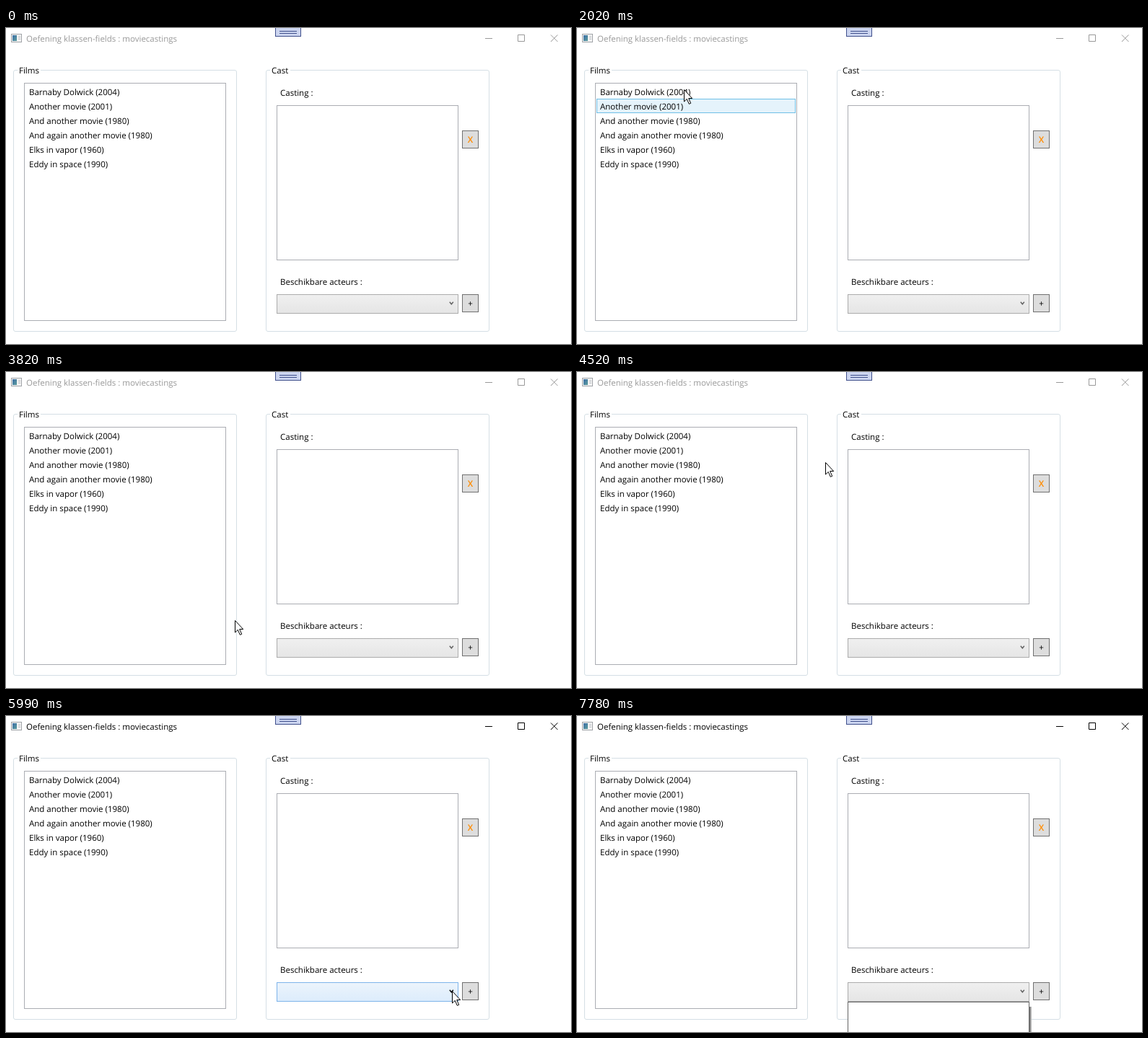
Write an HTML page that moves like this. It is 783 px wide and 438 px high and loops after 8000 ms.

```html
<!DOCTYPE html>
<html lang="nl">
<head>
<meta charset="utf-8">
<title>Moviecastings</title>
<style>
  html, body { margin: 0; width: 100%; height: 100%; overflow: hidden; background: #fff; }
  svg { display: block; width: 783px; height: 438px; }
  text { font: 11.5px "Open Sans", "Noto Sans", sans-serif; text-rendering: geometricPrecision; white-space: pre; }
  .mid { text-anchor: middle; }
  .bar { --ink: #999; }
  .bar.active { --ink: #000; }
  .bar text { fill: var(--ink); }
  .bar .ctl { fill: none; stroke: var(--ink); }
  .list { fill: #fff; stroke: #abadb3; }
  .btn { fill: #ddd; stroke: #707070; }
  .combo rect { fill: url(#idle); stroke: #acacac; }
  .combo path { fill: none; stroke: #606060; stroke-width: 1.4; }
  .combo.hover rect { fill: url(#hot); stroke: #7eb4ea; }
  .combo.hover path { stroke: #000; }
</style>
</head>
<body>
<svg viewBox="0 0 783 438">
  <defs>
    <linearGradient id="idle" x2="0" y2="1"><stop stop-color="#f0f0f0"/><stop offset="1" stop-color="#e5e5e5"/></linearGradient>
    <linearGradient id="hot" x2="0" y2="1"><stop stop-color="#ecf4fc"/><stop offset="1" stop-color="#dcecfc"/></linearGradient>
    <linearGradient id="shade"><stop stop-color="#666"/><stop offset="1" stop-color="#ccc"/></linearGradient>
    <linearGradient id="pane" x2="1" y2="1"><stop stop-color="#3f6fa8"/><stop offset="1" stop-color="#5a9c9c"/></linearGradient>
  </defs>

  <g class="bar" id="bar">
    <rect x="7.5" y="8.5" width="14" height="11" fill="#f4f4f4" stroke="#a0a4a8"/>
    <rect x="9" y="10" width="6" height="8" fill="url(#pane)"/>
    <path d="M17 11.5h3m-3 2h3m-3 2h3" stroke="#c4c8cc"/>
    <text x="28" y="19">Oefening klassen-fields : moviecastings</text>
    <path class="ctl" d="M664 14.5h10m35.5-5h9v9h-9z"/>
    <path class="ctl" d="M755 9.5l9.5 9.5m0-9.5l-9.5 9.5"/>
  </g>

  <rect x="373.5" y="-1.5" width="35" height="13" fill="#ccd5f0" stroke="#40508c"/>
  <path d="M379 4.5h24m-24 3h24" stroke="#40508c"/>

  <rect id="group" x="10.5" y="58.5" width="309" height="362" rx="2.5" fill="none" stroke="#d5dfe5"/>
  <use href="#group" x="350"/>
  <path d="M16 58.5h32m318 0h28" stroke="#fff" stroke-width="3"/>

  <text x="18" y="63">Films</text>
  <text x="368" y="63">Cast</text>
  <rect class="list" x="25.5" y="76.5" width="279" height="329"/>
  <rect id="row" x="27.5" width="275" height="19" fill="#e5f3fb" stroke="#70c0e7"/>
  <g id="films"></g>

  <text x="380" y="94">Casting :</text>
  <rect class="list" x="375.5" y="107.5" width="251" height="214"/>
  <rect class="btn" id="btn" x="632.5" y="142.5" width="22" height="24"/>
  <text class="mid" x="643.5" y="159" style="fill:#ff8c00;font-size:12px;font-weight:600">X</text>
  <text x="380" y="356">Beschikbare acteurs :</text>
  <use href="#btn" y="227"/>
  <text class="mid" x="643.5" y="386">+</text>
  <g class="combo" id="combo">
    <rect x="375.5" y="369.5" width="251" height="26"/>
    <path d="M614.8 379.8l2.5 3 2.5-3"/>
  </g>

  <g id="popup">
    <rect id="shadow" x="627" y="403" width="3" fill="url(#shade)"/>
    <rect id="sheet" x="375.5" y="396.5" width="251" fill="#fff" stroke="#646464"/>
  </g>
  <path id="cursor" d="M.5.5v16.5l3.8-3.6 3 6.9 2.4-1-3-6.8h5z" fill="#fff" stroke="#000"/>
</svg>
<script>
const LOOP = 8000, STEP = 77, ACTIVE = 5900, OPENING = 6060, OPEN = 6140;
const $ = id => document.getElementById(id);

const films = ["Barnaby Dolwick (2004)", "Another movie (2001)", "And another movie (1980)",
  "And again another movie (1980)", "Elks in vapor (1960)", "Eddy in space (1990)"];
films.forEach((name, i) => {
  const t = document.createElementNS("http://www.w3.org/2000/svg", "text");
  t.setAttribute("x", 32);
  t.setAttribute("y", 93 + 20 * i);
  t.textContent = name;
  $("films").append(t);
});

const mix = (a, b, f) => Math.round(a + (b - a) * f);

// One burst of pointer steps between two times, through keys [step, x, y].
function burst(from, to, ...keys) {
  const n = Math.round((to - from) / STEP);
  return Array.from({ length: n + 1 }, (_, i) => {
    const k = keys.findLastIndex(key => key[0] <= i);
    const [s, x, y] = keys[k], [s2, x2, y2] = keys[k + 1] || [s + 1, x, y];
    const f = (i - s) / (s2 - s);
    return { t: from + (n && (to - from) * i / n), x: mix(x, x2, f), y: mix(y, y2, f) };
  });
}

const roam = [
  burst(780, 930, [0, 673, 47], [2, 247, 519]),
  burst(1470, 2230, [0, 8, 282], [3, 110, 71], [5, 185, 130], [7, 148, 85], [10, 20, 160]),
  burst(2330, 3110, [0, 8, 220], [1, 60, 237], [4, 212, 188], [5, 228, 167], [9, 170, -20], [10, 60, 62]),
  burst(3190, 3970, [0, 11, 90], [7, 290, 318], [8, 317, 344], [10, 300, 220]),
  burst(4050, 4280, [0, 285, 150], [3, 353, 67])
];
const pick = [
  burst(4430, 5210, [0, 350, 95], [1, 344, 125], [6, 500, 335], [10, 585, 384]),
  burst(5270, 5520, [0, 600, 380], [3, 620, 385]),
  burst(5670, 5670, [0, 620, 383]),
  burst(5820, 5820, [0, 618, 381]),
  burst(6380, 6630, [0, 616, 395], [3, 610, 448]),
  burst(6770, 7090, [0, 575, 430], [4, 545, 380]),
  burst(7410, 7780, [0, 544, 384], [5, 540, 442])
];
const steps = [...roam, ...pick].flat();

const inside = (p, x1, y1, x2, y2) => !!p && p.x >= x1 && p.x < x2 && p.y >= y1 && p.y < y2;
const show = (id, on) => { $(id).style.display = on ? "" : "none"; };

function draw(t) {
  const n = steps.findLastIndex(s => s.t <= t);
  const pos = steps[n], last = steps[n - 1];

  show("cursor", pos);
  if (pos) $("cursor").setAttribute("transform", `translate(${pos.x} ${pos.y})`);

  // The row highlight trails the pointer by one step.
  const onRow = inside(last, 27, 78, 303, 198);
  show("row", onRow);
  if (onRow) $("row").setAttribute("y", 78.5 + 20 * Math.floor((last.y - 78) / 20));

  $("combo").classList.toggle("hover", inside(pos, 375, 369, 627, 396));
  $("bar").classList.toggle("active", t >= ACTIVE);

  show("popup", t >= OPENING);
  const h = t < OPEN ? 22 : 90;
  $("sheet").setAttribute("height", h);
  $("shadow").setAttribute("height", h - 5);
}

const start = performance.now();
function tick() {
  draw((performance.now() - start) % LOOP);
  requestAnimationFrame(tick);
}
tick();
</script>
</body>
</html>
```
